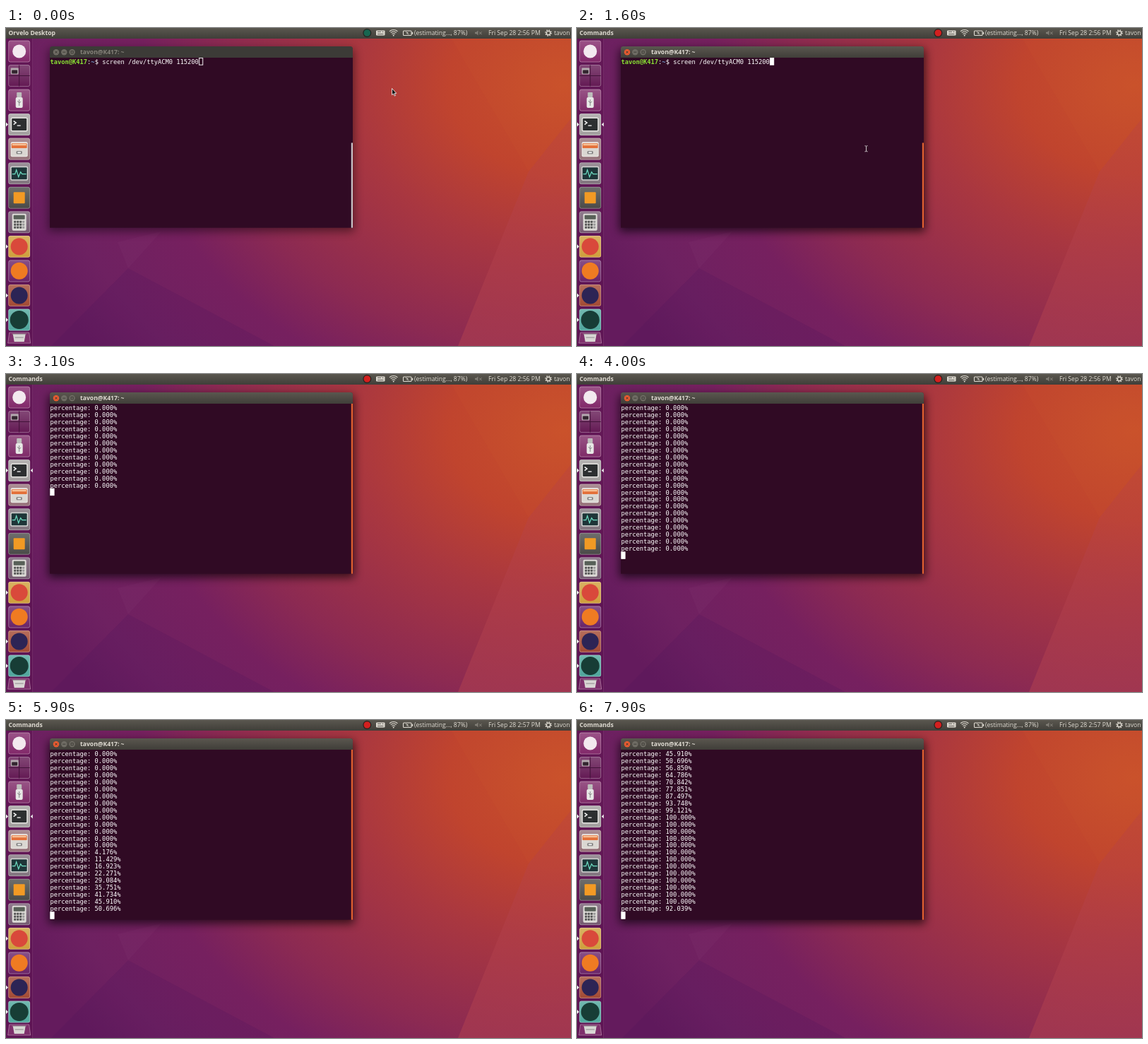
An HTML page that plays this animation: 800x450 px, repeating every 8 s.

```html
<!DOCTYPE html>
<html lang="en">
<head>
<meta charset="utf-8">
<title>Progress log</title>
<style>
html, body { margin: 0; width: 100%; height: 100%; overflow: hidden; background: #651b5e; }
svg { display: block; width: 800px; height: 450px; }
text { white-space: pre; }
.ui { font: 8.6px "Open Sans", "Noto Sans", sans-serif; fill: #dfdbd2; }
.bold { font-weight: 700; }
.mono { font: 8.74px "DejaVu Sans Mono", "Liberation Mono", monospace; fill: #fff; }
.user { fill: #8ae234; font-weight: 700; }
.path { fill: #729fcf; font-weight: 700; }
</style>
</head>
<body>
<svg viewBox="0 0 800 450" xmlns="http://www.w3.org/2000/svg">
  <defs>
    <radialGradient id="sky" gradientUnits="userSpaceOnUse" cx="0" cy="0" r="820"
      gradientTransform="translate(790 80) scale(1 .77)">
      <stop offset="0" stop-color="#c9512b"/>
      <stop offset=".2" stop-color="#c0442e"/>
      <stop offset=".37" stop-color="#a93740"/>
      <stop offset=".6" stop-color="#8c2a52"/>
      <stop offset=".735" stop-color="#76205f"/>
      <stop offset=".9" stop-color="#6e2161"/>
      <stop offset="1" stop-color="#641b5d"/>
    </radialGradient>
    <linearGradient id="corner" x1="0" y1="0" x2="0" y2="1">
      <stop offset="0" stop-color="#b84448" stop-opacity=".3"/>
      <stop offset="1" stop-color="#b04050" stop-opacity=".55"/>
    </linearGradient>
    <linearGradient id="bar" x1="0" y1="0" x2="0" y2="1">
      <stop offset="0" stop-color="#5a574f"/>
      <stop offset="1" stop-color="#403e39"/>
    </linearGradient>
    <linearGradient id="gloss" x1="0" y1="0" x2="0" y2="1">
      <stop offset="0" stop-color="#fff" stop-opacity=".2"/>
      <stop offset="1" stop-color="#fff" stop-opacity="0"/>
    </linearGradient>
    <filter id="blur" x="-10%" y="-10%" width="120%" height="125%">
      <feGaussianBlur stdDeviation="6.5"/>
    </filter>
  </defs>

  <!-- Wallpaper -->
  <rect width="800" height="450" fill="url(#sky)"/>
  <path d="M740 203L800 128V450H640Z" fill="url(#corner)"/>
  <path d="M740 203L630 14H800V128Z" fill="#d06a2c" opacity=".07"/>
  <path d="M173 340L64 450H380Z" fill="#4c1258" opacity=".18"/>
  <path d="M173 340L158 303L220 288Z" fill="#fff" opacity=".02"/>

  <!-- Launcher -->
  <rect y="14" width="37.5" height="436" fill="#560a48" opacity=".4"/>
  <path d="M37.5 14V450" stroke="#8d5080" stroke-width=".6" opacity=".6"/>
  <g id="tiles"></g>

  <!-- Panel -->
  <rect width="800" height="15" fill="url(#bar)"/>
  <text id="app" class="ui bold" x="3.5" y="10"></text>
  <circle cx="511.3" cy="7" r="6" fill="#24211f"/>
  <circle id="rec" cx="511.3" cy="7" r="4.8"/>
  <g fill="#dfdbd2">
    <rect x="524" y="3.5" width="12.5" height="7" rx="1"/>
    <path d="M526 5.5H531M526 8.5H534.5M532.5 5.5H534.5" stroke="#4b4843" stroke-width=".9"/>
    <circle cx="548.7" cy="10.5" r="1"/>
    <g fill="none" stroke="#dfdbd2" stroke-width="1.1">
      <path d="M546.4 8.7Q548.7 6.7 551 8.7M544.7 6.7Q548.7 3.2 552.7 6.7M543 4.8Q548.7 .2 554.4 4.8"/>
      <rect x="562.5" y="4" width="11.5" height="6.5" rx="1"/>
    </g>
    <rect x="574.5" y="5.8" width="1.7" height="3"/>
    <path d="M565 4.8L570 6.5L568 7.2L572 9.6L566.5 8L568.3 7.2Z"/>
    <path d="M664 5.8H666L668.5 3.5V10.5L666 8.3H664ZM670.5 5.3L674 8.8L673.4 9.4L669.9 5.9ZM673.4 5L674 5.6L670.5 9.2L669.9 8.6Z" opacity=".35"/>
  </g>
  <text class="ui" x="578" y="10">(estimating..., 87%)</text>
  <text id="clock" class="ui" x="683" y="10"></text>
  <circle cx="768" cy="7" r="2.7" fill="none" stroke="#dfdbd2" stroke-width="1.3"/>
  <circle cx="768" cy="7" r="4.1" fill="none" stroke="#dfdbd2" stroke-width="1.5" stroke-dasharray="1.5 1.72"/>
  <text class="ui" x="776" y="10">tavon</text>

  <!-- Window -->
  <rect id="shadow" x="60" y="30" width="433" height="258" filter="url(#blur)"/>
  <path d="M62 42V29.5Q62 26 65.5 26H487.5Q491 26 491 29.5V42Z" fill="#3c3b37"/>
  <path id="head" d="M62 42V29.5Q62 26 65.5 26H487.5Q491 26 491 29.5V42Z" fill="url(#bar)"/>
  <circle id="close" cx="71" cy="34.2" r="4.2"/>
  <g fill="#6f6c64">
    <circle cx="82.3" cy="34.2" r="4.2"/>
    <circle cx="93.6" cy="34.2" r="4.2"/>
  </g>
  <g fill="none" stroke="#3a3833" stroke-width=".9">
    <path d="M69.4 32.6L72.6 35.8M72.6 32.6L69.4 35.8M80.3 34.2H84.3"/>
    <rect x="92" y="32.6" width="3.2" height="3.2"/>
  </g>
  <text id="title" class="ui bold" x="105" y="37.3">tavon@K417: ~</text>
  <rect x="62" y="42" width="429" height="240.7" fill="#300a24"/>
  <rect id="scroll" x="488.8" width="2.2"/>
  <text id="prompt" class="mono" x="62.5" y="51"><tspan class="user">tavon@K417</tspan>:<tspan class="path">~</tspan>$ screen /dev/ttyACM0 115200</text>
  <g id="log"></g>
  <rect id="caret" width="5.3" height="9.6" stroke="#fff" stroke-width=".9"/>

  <!-- Pointer -->
  <g id="mouse">
    <path id="arrow" d="M0 0V9.2L2.1 7.4L3.6 10.6L5 10L3.6 6.9H6.3Z" fill="#111" stroke="#fff" stroke-width=".8"/>
    <path id="beam" d="M-2 -4H-.6L0 -3.4L.6 -4H2M0 -3.4V3.4M-2 4H-.6L0 3.4L.6 4H2" fill="none" stroke="#ddd" stroke-width=".9"/>
  </g>
</svg>

<script>
const $ = id => document.getElementById(id);
const LOOP = 8000, STEP = 100, ROWS = 23, PITCH = 9.96, LEFT = 62.5;
const RECORD = 500, FOCUS = 1100, ENTER = 1900, MINUTE = 5900;

// Launcher tiles: background colour, icon markup around (0,0), running flag
const disc = (color, r = 11) => `<circle r="${r}" fill="${color}"/>`;
const box = (x, y, w, h, color, r = 1) =>
  `<rect x="${x}" y="${y}" width="${w}" height="${h}" rx="${r}" fill="${color}"/>`;
const line = (d, color, w = 1) => `<path d="${d}" fill="none" stroke="${color}" stroke-width="${w}"/>`;

let keys = "";
for (let i = 0; i < 12; i++)
  keys += box(-7.5 + i % 4 * 4, -2 + (i / 4 | 0) * 4, 3, 3, i % 4 == 3 ? "#999" : "#555", .4);

const tiles = [
  ["#82286a", disc("#f3e9ef", 9.5)],
  ["#641a54", line("M0 -15V15M-15 0H15", "#401238") + box(-12, -11, 11, 9, "#b5aab0") + box(-10.5, -8, 8, 5, "#33252f")],
  ["#7f2b68", box(-5, -4, 10, 15, "#e8e8e6", 2) + box(-3.5, -11, 7, 7, "#bdbdbb") + line("M0 8V-1M-2.5 1L0 4L2.5 2", "#888")],
  ["#a3a09f", box(-12, -10, 24, 20, "#e4e3e0", 2) + box(-10.5, -8.5, 21, 17, "#2c2f30") + line("M-8 -5L-4.5 -2.5L-8 0M-3 1.5H2", "#fff", 1.4), true],
  ["#957078", box(-12, -10, 24, 21, "#eceae6", 2) + box(-11, -8, 22, 7, "#e3703a") + line("M-10 -6H10", "#f8c9a0", 2) + box(-11, -1, 22, 11, "#dad7d2") + box(-4, 3, 8, 4, "#777") + box(-2.5, 4, 5, 2, "#eee", .5)],
  ["#82757f", box(-12.5, -10, 25, 20, "#d4d6d4", 2) + box(-11, -8.5, 22, 17, "#1e3538") + line("M-10 1H-6L-4 -5L-1 5L2 -2L4 1H10", "#6fe0c5", 1.2)],
  ["#4a4a48", box(-8, -8, 16, 16, "#f29a24")],
  ["#745a70", box(-10, -12, 20, 24, "#dcdad6", 2) + box(-8, -10, 16, 6, "#586058") + keys],
  ["#cf9f3c", disc("#d9493b", 12), true],
  ["#6a2468", disc("#ef7b22", 12)],
  ["#a34a34", disc("#2c2455", 12), true],
  ["#4fa69c", disc("#173d36", 13), true]
];
$("tiles").innerHTML = tiles.map(([bg, icon, running], i) => {
  const frame = box(-15.3, -15.3, 30.6, 30.6, bg, 2.5) +
    `<rect x="-15" y="-15" width="30" height="30" rx="2.5" fill="url(#gloss)" stroke="#fff" stroke-opacity=".4" stroke-width=".8"/>`;
  const tick = running ? `<path d="M-18.7 -3L-15.7 0L-18.7 3Z" fill="#eee"/>` : "";
  return `<g transform="translate(18.7 ${33 + i * 34.54})">${frame}${icon}${tick}</g>`;
}).join("") +
  `<g transform="translate(18.7 438)"><path d="M-14 -7H14L16 8H-16Z" fill="#7e306c" stroke="#b98cae" stroke-width=".7"/>
   <path d="M-9 -5H9L7 6H-7Z" fill="#d9d6d4"/><path d="M-10 -5H10M-6 0H6" stroke="#8d888b" stroke-width="1.2"/></g>
   <path id="active" d="M37.8 133.5L34.8 136.5L37.8 139.5Z" fill="#eee"/>`;

// Progress values: idle lines, a climb, a plateau, then the first drop
const values = [
  ...Array(30).fill(0),
  4.176, 11.429, 16.923, 22.271, 29.084, 35.751, 41.734, 45.910,
  50.696, 56.850, 64.786, 70.842, 77.851, 87.497, 93.748, 99.121,
  ...Array(13).fill(100), 92.039
];
// Printed line count at given times
const pace = [[1950, 0], [3100, 12], [4000, 21], [5000, 31], [6700, 47], [7900, 60]];

function printed(t) {
  if (t <= pace[0][0]) return 0;
  const i = Math.max(1, pace.findIndex(p => t <= p[0]));
  const [t0, n0] = pace[i - 1], [t1, n1] = pace[i];
  return Math.floor(n0 + (n1 - n0) * (t - t0) / (t1 - t0) + 1e-6);
}

const rows = Array.from({ length: ROWS }, (_, i) => {
  const row = document.createElementNS("http://www.w3.org/2000/svg", "text");
  row.setAttribute("class", "mono");
  row.setAttribute("x", LEFT);
  row.setAttribute("y", 51 + i * PITCH);
  return $("log").appendChild(row);
});

const set = (id, attrs) => {
  for (const k in attrs) $(id).setAttribute(k, attrs[k]);
};
const show = (id, on) => set(id, { visibility: on ? "visible" : "hidden" });

function drawPointer(t) {
  const p = Math.min(1, Math.max(0, (t - 300) / 700));
  const e = p * p * (3 - 2 * p);
  const x = 546.5 - 137 * e, y = 85.5 + 85.3 * e;
  const on = t < ENTER, inside = x < 488;
  set("mouse", { transform: `translate(${x} ${y})` });
  show("arrow", on && !inside);
  show("beam", on && inside);
}

function draw(t) {
  const focus = t >= FOCUS, running = t >= ENTER;
  $("app").textContent = focus ? "Commands" : "Orvelo Desktop";
  $("clock").textContent = `Fri Sep 28 2:${t < MINUTE ? 56 : 57} PM`;
  set("rec", { fill: t < RECORD ? "#176650" : "#d3201f" });
  show("active", focus);
  show("head", focus);
  set("shadow", { opacity: focus ? .65 : .45 });
  set("close", { fill: focus ? "#ea5b30" : "#6f6c64" });
  set("title", { style: `fill:${focus ? "#dfdbd2" : "#85827a"}` });
  const top = running ? 42 : 162.5;
  set("scroll", { y: top, height: 282.7 - top, fill: focus ? "#e2602f" : "#c9c3c7" });

  show("prompt", !running);
  const n = printed(t), first = Math.max(0, n - ROWS);
  rows.forEach((row, i) => {
    const k = first + i;
    row.textContent = k < n ? `percentage: ${values[k].toFixed(3)}%` : "";
  });
  set("caret", {
    x: running ? LEFT + .3 : 273.4,
    y: 42.6 + Math.min(n, ROWS) * PITCH,
    fill: focus ? "#fff" : "none"
  });
  drawPointer(t);
}

const start = performance.now();
function tick() {
  const t = (performance.now() - start) % LOOP;
  draw(Math.floor(t / STEP) * STEP);
  requestAnimationFrame(tick);
}
tick();
</script>
</body>
</html>
```
